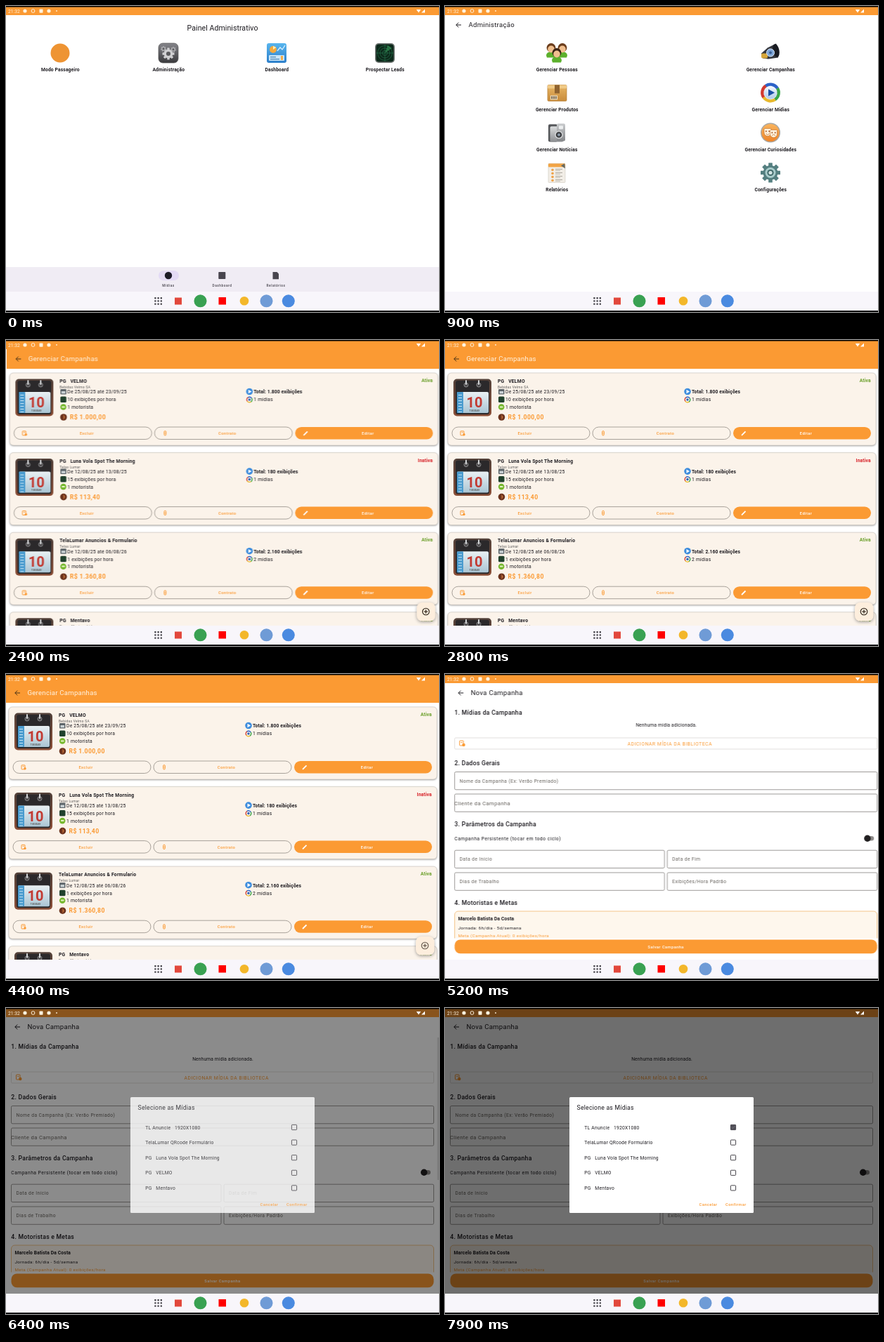
Write an HTML page with a canvas that moves like this. It is 616 px wide and 436 px high and loops after 8 s.

```html
<!DOCTYPE html>
<html lang="pt-BR">
<head>
<meta charset="utf-8">
<title>Painel Administrativo</title>
<style>
html, body { margin: 0; width: 100%; height: 100%; overflow: hidden; background: #fff; }
canvas { display: block; }
</style>
</head>
<body>
<canvas id="stage" width="616" height="436"></canvas>
<script>
const W = 616, H = 436, TOP = 13, BOTTOM = 407, LOOP = 8000, STEP = 100, DP = 0.48125;
const ORANGE = '#fb9a33', INK = '#1d1b20';
const OPEN = { admin: 380, list: 1800, form: 4773, dialog: 6200 }, SLIDE = 800;
const screen = document.getElementById('stage').getContext('2d');
let c = screen;

// weight, size in dp, letter spacing in px
const FONT = {
  headline: [400, 22, 0.05], title: [400, 20, 0.24], section: [500, 18, 0.24], dialog: [400, 18, 0.24],
  bold: [600, 14, 0.13], name: [600, 14, 0.25], body: [400, 14, 0.24], note: [400, 14, 0.12],
  wide: [400, 14, 0.47], label: [400, 14, 0.4], big: [400, 16, 0.36], caps: [400, 14, 0.58],
  small: [400, 13, 0.35], button: [500, 12, 0.4], tiny: [400, 10, 0.3], nav: [500, 10, 0.5],
  price: [700, 18, 0.38], clock: [400, 14, 0]
};

function text(s, x, y, style, color = INK, align = 'left') {
  const [weight, size, gap] = FONT[style];
  c.font = `${weight} ${size * DP}px Roboto, sans-serif`;
  c.letterSpacing = gap + 'px';
  c.textAlign = align;
  c.fillStyle = color;
  c.fillText(s, x, y);
}

function box(x, y, w, h, r, fill, stroke, line = 0.7) {
  c.beginPath();
  c.roundRect(x, y, w, h, r);
  if (fill) { c.fillStyle = fill; c.fill(); }
  if (stroke) { c.strokeStyle = stroke; c.lineWidth = line; c.stroke(); }
}

function disc(x, y, r, fill, stroke, line = 1) {
  c.beginPath();
  c.arc(x, y, r, 0, 7);
  if (fill) { c.fillStyle = fill; c.fill(); }
  if (stroke) { c.strokeStyle = stroke; c.lineWidth = line; c.stroke(); }
}

function poly(points, fill, stroke, line = 1) {
  c.beginPath();
  points.forEach(([x, y]) => c.lineTo(x, y));
  if (fill) { c.fillStyle = fill; c.fill(); }
  if (stroke) { c.strokeStyle = stroke; c.lineWidth = line; c.stroke(); }
}

function shade(y0, y1, a, b) {
  const g = c.createLinearGradient(0, y0, 0, y1);
  g.addColorStop(0, a);
  g.addColorStop(1, b);
  return g;
}

function at(x, y, draw) {
  c.save();
  c.translate(x, y);
  draw();
  c.restore();
}

function gear(x, y, r, teeth, color, hole) {
  at(x, y, () => {
    for (let i = 0; i < teeth; i++) {
      box(-r * 0.2, -r, r * 0.4, r * 0.5, 0.5, color);
      c.rotate(Math.PI * 2 / teeth);
    }
    disc(0, 0, r * 0.75, color);
    disc(0, 0, r * 0.36, hole);
  });
}

function backArrow(color) {
  poly([[20, 27], [12.8, 27]], null, color, 1);
  poly([[16.2, 23.6], [12.8, 27], [16.2, 30.4]], null, color, 1);
}

function colorRing(r, line) {
  ['#3aa648', '#e9b92c', '#d23a30', '#2c62c8'].forEach((color, i) => {
    c.beginPath();
    c.arc(0, 0, r, i * 1.571 - 0.6, i * 1.571 + 1);
    c.strokeStyle = color;
    c.lineWidth = line;
    c.stroke();
  });
}

const icons = {
  mode() { disc(0, 0, 13.5, '#ee9433'); },
  admin() {
    box(-14, -14, 28, 28, 6, shade(-14, 14, '#85858a', '#3a3a3d'), '#555');
    gear(0, 1, 8.5, 8, '#d0d0d2', '#59595c');
    gear(-7, -6, 4, 7, '#aaaaad', '#59595c');
    gear(7, -5, 4, 7, '#aaaaad', '#59595c');
  },
  dashboard() {
    box(-14, -14, 28, 28, 3, shade(-14, 14, '#58b5ee', '#2c7fca'));
    disc(-5, -5, 5, '#f4a93c');
    poly([[-5, -5], [-5, -10], [-0.5, -8]], '#fff0b8');
    poly([[1, -3], [5, -8], [8, -5], [12, -11]], null, '#d9f1ff', 1.3);
    box(-11, 3, 22, 8, 1, '#c8e5f8');
    box(-9, 5, 8, 1.4, 0, '#5790bd');
    box(-9, 8, 13, 1.4, 0, '#5790bd');
    box(6, 4, 3, 6, 0, '#f3ad49');
  },
  radar() {
    box(-14, -14, 28, 28, 5, '#737977');
    box(-12.5, -12.5, 25, 25, 4, '#0d291b');
    for (const r of [3.5, 7, 10.5]) disc(0, 0, r, null, '#24704a', 0.7);
    poly([[-12, 0], [12, 0]], null, '#24704a', 0.7);
    poly([[0, -12], [0, 12]], null, '#24704a', 0.7);
    poly([[0, 0], [4, -11], [10, -7]], 'rgba(66,180,104,.5)');
  },
  people() {
    for (const [x, y, hair] of [[-8, -7, '#6b3d1c'], [8, -7, '#6b3d1c'], [0, 0, '#3b2314']]) at(x, y, () => {
      c.beginPath();
      c.ellipse(0, 11, 7, 5.5, 0, Math.PI, 0);
      c.lineTo(6, 14);
      c.lineTo(-6, 14);
      c.fillStyle = '#5cb02c';
      c.fill();
      disc(0, 0, 6.4, hair);
      c.beginPath();
      c.ellipse(0, 2, 4.8, 5, 0, 0, 7);
      c.fillStyle = '#f0bf8e';
      c.fill();
    });
  },
  megaphone() {
    poly([[-13, 1], [-4, -7], [8, -13], [12, -4], [11, 7], [-3, 9], [-11, 8]], '#34363d');
    c.beginPath();
    c.ellipse(8, -3, 4.5, 9.5, -0.2, 0, 7);
    c.fillStyle = '#191b22';
    c.fill();
    box(-13, 1, 9, 7, 2, '#d6a63a');
    disc(0, 0, 5.5, '#7ea6d8', '#dbe6f4');
    disc(0, 0, 2, '#3a5f96');
  },
  parcel() {
    box(-13, -11, 27, 23, 1.5, shade(-11, 12, '#e9b766', '#c88c3c'), '#b67d33');
    box(-13, -11, 27, 5, 1, '#f0ca87');
    box(-3, -11, 7, 12, 0, '#8f6330');
    box(-9, 4, 10, 6, 0, '#f4e7cb');
    for (let i = 0; i < 4; i++) box(-8 + i * 2.2, 5, 1.2, 4, 0, '#5c4930');
  },
  play() {
    disc(0, 0, 14, '#e9eef5');
    colorRing(11.8, 4.2);
    disc(0, 0, 9, shade(-9, 9, '#f7fbff', '#afc9e9'));
    poly([[-3, -5], [6, 0], [-3, 5]], '#194fa6');
  },
  camera() {
    box(-12, -12, 13, 25, 2, '#55575a');
    box(-9.5, -9, 19, 22, 2, shade(-9, 13, '#dcdedf', '#8b8d90'));
    box(0, -13, 12, 25, 2, shade(-13, 12, '#c9cbcd', '#85878a'));
    box(3, -10, 6, 5, 1, '#eceeef');
    disc(3, 3, 5, '#3b3d40', '#d8dadb', 1.4);
    disc(3, 3, 2, '#8b99a8');
  },
  masks() {
    disc(0, 0, 14, '#a9a7a3');
    disc(0, 0, 12.6, shade(-12, 12, '#f9b35c', '#ee862b'));
    for (const [x, y, mood] of [[-4, -1, 1], [4.5, 1, -1]]) at(x, y, () => {
      box(-5, -5, 10, 11, [1, 1, 5, 5], '#fff1dc', '#ba691f', 0.6);
      disc(-2.2, -1, 1, '#a2521e');
      disc(2.2, -1, 1, '#a2521e');
      c.beginPath();
      c.arc(0, 2.8 - mood * 0.8, 2, mood > 0 ? 0 : Math.PI, mood > 0 ? Math.PI : 0);
      c.stroke();
    });
  },
  report() {
    box(-12, -13, 24, 27, 1, '#f2eee7', '#d3cec5');
    box(-12, -13, 24, 5, 1, '#f2a445');
    for (let y = -4; y < 12; y += 5) {
      disc(-6, y, 1.8, '#eea34c');
      box(-2, y - 1.4, 10, 1, 0, '#aaa69e');
      box(-2, y + 0.6, 7, 1, 0, '#c2beb6');
    }
    poly([[6, -10], [11, -13], [12, -6]], '#636b67');
  },
  settings() {
    gear(0, 0, 14, 8, '#547f80', '#547f80');
    disc(0, 0, 7.5, '#a9cccb');
    disc(0, 0, 4.6, '#3f6869');
    disc(0, 0, 2.6, '#d4e5e4');
  }
};

function tile(icon, label, x, y) {
  at(x, y, icons[icon]);
  text(label, x + 0.3, y + 26, 'bold', INK, 'center');
}

function homePage() {
  text('Painel Administrativo', 308, 35, 'headline', INK, 'center');
  [['mode', 'Modo Passageiro'], ['admin', 'Administração'], ['dashboard', 'Dashboard'], ['radar', 'Prospectar Leads']]
    .forEach(([icon, label], i) => tile(icon, label, 77 + i * 154, 67));
  box(0, 372, W, BOTTOM - 372, 0, '#f0ecf4');
  box(217, 377, 29, 14, 7, '#e3daf5');
  disc(231, 384, 5.2, '#1b1928');
  box(302.3, 379, 10, 10, 0.8, '#48454e');
  poly([[379.5, 379], [385.5, 379], [388, 381.5], [388, 389.3], [379.5, 389.3]], '#48454e');
  ['Mídias', 'Dashboard', 'Relatórios'].forEach((s, i) =>
    text(s, 231 + i * 76.5, 399.8, 'nav', '#48454e', 'center'));
}

function adminPage() {
  backArrow(INK);
  text('Administração', 30.5, 30.3, 'title');
  [['people', 'Gerenciar Pessoas', 'megaphone', 'Gerenciar Campanhas'],
   ['parcel', 'Gerenciar Produtos', 'play', 'Gerenciar Mídias'],
   ['camera', 'Gerenciar Notícias', 'masks', 'Gerenciar Curiosidades'],
   ['report', 'Relatórios', 'settings', 'Configurações']]
    .forEach(([a, la, b, lb], i) => {
      tile(a, la, 156, 66.5 + i * 57);
      tile(b, lb, 460, 66.5 + i * 57);
    });
}

function calendar() {
  box(12, 55.5, 54, 53, 5, shade(55, 109, '#504039', '#8b4e36'));
  box(15, 58, 48, 48, 3, '#2b292b');
  box(17, 74, 45, 30, 2, shade(74, 104, '#e9f0f3', '#aac5d4'));
  box(17, 74, 9, 30, 1, '#4a9bce');
  for (let y = 78; y < 103; y += 4) box(19, y, 5, 1, 0, '#c7e4f4');
  for (const x of [30, 48]) {
    disc(x, 64, 3, '#4a484a', '#8b8b8d');
    box(x - 1, 57, 2, 7, 1, '#d0d2d4');
  }
  c.font = '700 20px Roboto, sans-serif';
  c.letterSpacing = '0px';
  c.textAlign = 'center';
  c.fillStyle = '#c23a32';
  c.fillText('10', 42, 96);
  c.font = '500 3.5px Roboto, sans-serif';
  c.fillStyle = '#555';
  c.fillText('TUESDAY', 42, 101.5);
}

function buttonIcon(kind, x, y, color) {
  if (kind === 'Excluir') {
    box(x - 3, y - 3, 5, 6, 0.5, null, color, 1);
    poly([[x - 1.5, y - 1], [x + 1, y - 1]], null, color, 0.8);
    disc(x + 2, y + 2, 1.7, color);
  } else if (kind === 'Contrato') {
    box(x - 1.4, y - 3.2, 2.8, 6.4, 1.4, null, color, 0.9);
    poly([[x, y - 1.5], [x, y + 1.8]], null, color, 0.8);
  } else {
    poly([[x - 3, y + 3], [x + 2.5, y - 2.5]], null, color, 1.8);
  }
}

function campaignCard(y, [name, client, dates, perHour, total, media, price, active]) {
  at(0, y, () => {
    c.save();
    c.shadowColor = 'rgba(0,0,0,.4)';
    c.shadowBlur = 2.5;
    c.shadowOffsetY = 1;
    box(4, 47, 609, 103, 5, '#fbf3ea');
    c.restore();
    box(4, 47, 609, 103, 5, null, '#cbc4bd', 0.6);
    calendar();
    text(name, 75, 61, 'name');
    text(client, 75, 69, 'tiny', '#555');
    box(76, 70, 8.5, 7.5, 1, '#5c6469');
    box(77.5, 73, 5.5, 3.3, 0, '#cbd3d6');
    box(76, 80.5, 8.5, 8.5, 1.5, '#20412c');
    disc(80.2, 95.5, 4.3, '#76b82f');
    box(77.8, 94.4, 4.8, 2, 1, '#e2f3c4');
    disc(80.5, 110, 4.8, '#6b321d');
    poly([[80.5, 106], [82.5, 110], [80.5, 114]], '#c9743d');
    text(dates, 86, 76.4, 'body');
    text(perHour + ' exibições por hora', 86, 87.3, 'body');
    text('1 motorista', 86, 98, 'body');
    text(price, 89.5, 113, 'price', ORANGE);
    disc(345, 73.5, 4.8, '#3e8ddd');
    poly([[343.5, 70.8], [348, 73.5], [343.5, 76.2]], '#fff');
    at(345, 85, () => {
      colorRing(3.8, 1.4);
      disc(0, 0, 1.8, '#3568b6');
    });
    text(`Total: ${total} exibições`, 351, 76.4, 'bold');
    text(media + ' mídias', 351, 87.3, 'body');
    text(active ? 'Ativa' : 'Inativa', 605.8, 60, 'bold', active ? '#6ca02c' : '#d8232a', 'right');
    ['Excluir', 'Contrato', 'Editar'].forEach((label, i) => {
      const x = 10 + i * 200, solid = i === 2;
      box(x, 124, 196, 17.5, 8.75, solid ? ORANGE : null, solid ? null : '#857f78');
      buttonIcon(label, x + 15, 132.8, solid ? '#fff' : ORANGE);
      text(label, x + 103.5, 135, 'button', solid ? '#fff' : ORANGE, 'center');
    });
  });
}

const campaigns = [
  ['PG   VELMO', 'Bebidas Velmo SA', 'De 25/08/25 até 23/09/25', 10, '1.800', 1, 'R$ 1.000,00', true],
  ['PG   Luna Vola Spot The Morning', 'Telas Lumar', 'De 12/08/25 até 13/08/25', 15, '180', 1, 'R$ 113,40', false],
  ['TelaLumar Anuncios & Formulario', 'Telas Lumar', 'De 12/08/25 até 06/08/26', 1, '2.160', 2, 'R$ 1.360,80', true],
  ['PG   Mentavo', 'Doces Mentavo Ltda', '', 1, '', 1, '', true]
];

function fabIcon(alpha) {
  c.save();
  c.globalAlpha *= alpha;
  disc(596, 387, 4.8, null, '#241a10', 1.1);
  poly([[593.2, 387], [598.8, 387]], null, '#241a10', 1.1);
  poly([[596, 384.2], [596, 389.8]], null, '#241a10', 1.1);
  c.restore();
}

function campaignsPage() {
  box(0, TOP, W, 41 - TOP, 0, ORANGE);
  backArrow('#4a3216');
  text('Gerenciar Campanhas', 30.5, 30.3, 'title', '#fff4e4');
  campaigns.forEach((item, i) => campaignCard(i * 113.6, item));
  c.save();
  c.shadowColor = 'rgba(0,0,0,.35)';
  c.shadowBlur = 4;
  c.shadowOffsetY = 1.5;
  box(583, 374, 26.5, 26.5, 7.5, '#fdeedd');
  c.restore();
}

function field(x, y, w, label) {
  box(x, y, w, 25.3, 1.8, null, '#85817e', 0.8);
  text(label, x + 7, y + 15.2, 'label', '#68645f');
}

function formPage() {
  backArrow(INK);
  text('Nova Campanha', 30.5, 30.3, 'title');
  text('1. Mídias da Campanha', 7.3, 58.2, 'section');
  text('Nenhuma mídia adicionada.', 308.5, 75.4, 'note', INK, 'center');
  box(7.5, 91, 601, 16, 1.5, null, '#d6d2ce');
  box(14.5, 95, 5.5, 7, 0.8, null, ORANGE, 1);
  poly([[16, 97.5], [18.6, 97.5]], null, ORANGE, 0.8);
  disc(20.3, 101, 2.2, ORANGE);
  text('ADICIONAR MÍDIA DA BIBLIOTECA', 313.7, 101.6, 'caps', ORANGE, 'center');
  text('2. Dados Gerais', 7.3, 130.2, 'section');
  field(7.5, 139.5, 601, 'Nome da Campanha (Ex: Verão Premiado)');
  field(7.5, 171, 601, '');
  text('Cliente da Campanha', 7, 186.7, 'big', '#68645f');
  text('3. Parâmetros da Campanha', 7.3, 216.7, 'section');
  text('Campanha Persistente (tocar em todo ciclo)', 7.3, 236.5, 'wide');
  box(591, 231, 13, 6.6, 3.3, '#8e8b89');
  disc(594.7, 234.3, 4.7, '#211f20');
  field(7.5, 251.2, 298.5, 'Data de Início');
  field(310, 251.2, 298.5, 'Data de Fim');
  field(7.5, 283, 298.5, 'Dias de Trabalho');
  field(310, 283, 298.5, 'Exibições/Hora Padrão');
  text('4. Motoristas e Metas', 7.3, 329.2, 'section');
  c.save();
  c.beginPath();
  c.rect(0, 330, W, 46.5);
  c.clip();
  box(7.5, 338, 601, 70, 5, '#fef7ed', '#f2b56c', 0.8);
  text('Marcelo Batista Da Costa', 12.5, 350.8, 'bold');
  text('Jornada: 6h/dia - 5d/semana', 12.5, 363.8, 'small');
  text('Meta (Campanha Atual): 0 exibições/hora', 12.5, 374.8, 'small', ORANGE);
  c.restore();
  box(7.5, 378.5, 601, 19.8, 8, ORANGE);
  text('Salvar Campanha', 308, 390.6, 'button', '#fff', 'center');
}

function render(draw) {
  const sheet = document.createElement('canvas');
  sheet.width = W;
  sheet.height = H;
  c = sheet.getContext('2d');
  box(0, 0, W, H, 0, '#fff');
  draw();
  c = screen;
  return sheet;
}

const [home, admin, list, form] = [homePage, adminPage, campaignsPage, formPage].map(render);

const clamp = v => Math.max(0, Math.min(1, v));

function bezier(x, x1, y1, x2, y2) {
  const curve = (s, a, b) => 3 * (1 - s) * (1 - s) * s * a + 3 * (1 - s) * s * s * b + s * s * s;
  let lo = 0, hi = 1;
  for (let i = 0; i < 24; i++) {
    const mid = (lo + hi) / 2;
    if (curve(mid, x1, x2) < x) lo = mid; else hi = mid;
  }
  return curve(lo, y1, y2);
}

// Material "emphasized" easing: two joined cubics
function emphasized(p) {
  if (p <= 0 || p >= 1) return clamp(p);
  return p < 1 / 6
    ? 0.4 * bezier(p * 6, 0.3, 0, 0.8, 0.15)
    : 0.4 + 0.6 * bezier((p - 1 / 6) * 1.2, 0.05, 0.7, 0.1, 1);
}

function sheetAt(page, x, alpha) {
  if (alpha <= 0) return;
  c.globalAlpha = alpha;
  c.drawImage(page, x, 0);
  c.globalAlpha = 1;
}

function slide(from, to, p) {
  const e = emphasized(p), shift = W / 4;
  sheetAt(from, -shift * e, 1 - clamp(p * 4));
  sheetAt(to, shift * (1 - e), clamp(p * 2));
}

function checkbox(x, y, fill) {
  box(x - 3.6, y - 3.6, 7.2, 7.2, 0.8, null, '#454349', 1);
  if (!fill) return;
  c.save();
  c.globalAlpha *= fill;
  box(x - 3.8, y - 3.8, 7.6, 7.6, 0.8, '#504e57');
  poly([[x - 2.2, y], [x - 0.6, y + 1.6], [x + 2.4, y - 1.6]], null, '#77757d', 0.9);
  c.restore();
}

function scrollbar(t) {
  const p = (t - OPEN.form) / SLIDE, fade = clamp((6500 - t) / 300);
  c.globalAlpha = fade;
  box(613.6 + W / 4 * (1 - emphasized(p)), 42, 2.4, 203, 0, '#a3a1a2');
  c.globalAlpha = 1;
}

function mediaDialog(t) {
  const shown = clamp((t - OPEN.dialog) / 250);
  if (!shown) return;
  box(0, 0, W, BOTTOM, 0, `rgba(0,0,0,${0.57 * shown})`);
  c.globalAlpha = shown;
  box(177, 127, 262, 165, 1.5, '#fff');
  text('Selecione as Mídias', 187.5, 145.2, 'dialog');
  ['TL Anuncie   1920X1080', 'TelaLumar QRcode Formulário', 'PG   Luna Vola Spot The Morning', 'PG   VELMO', 'PG   Mentavo']
    .forEach((s, i) => {
      const y = 170 + i * 21.6;
      const fill = i ? 0 : t >= 7900 ? 1 : t >= 7800 ? 0.5 : t >= 7600 ? 0.12 : 0;
      text(s, 198.3, y + 2.5, 'body');
      checkbox(410, y, fill);
    });
  text('Cancelar', 374.5, 282.2, 'button', ORANGE, 'center');
  text('Confirmar', 413.8, 282.2, 'button', ORANGE, 'center');
  c.globalAlpha = 1;
}

function statusIcons() {
  const pale = '#fff3df';
  text('21:32', 3, 9.5, 'clock', pale);
  disc(27, 7, 2.6, pale);
  disc(38.5, 7, 2.4, null, pale, 1);
  box(47.5, 4.5, 5, 5.2, 0.8, pale);
  disc(61, 7, 2.6, pale);
  disc(72, 7, 0.9, pale);
  poly([[583.8, 5], [590.2, 5], [587, 9.6]], '#fff');
  poly([[591, 9.6], [596, 9.6], [596, 4.6]], '#fff');
}

function taskbar() {
  box(0, BOTTOM, W, H - BOTTOM, 0, '#f8f6fb');
  for (let i = 0; i < 9; i++) box(211.2 + i % 3 * 4.2, 415 + Math.floor(i / 3) * 4.2, 2.4, 2.4, 0.8, '#3e3d43');
  box(240, 415.5, 10, 10, 0, '#e2483c');
  disc(276.5, 420.3, 9, '#39a152');
  box(302.5, 415, 10.5, 10.5, 0, '#f00');
  disc(339, 420.3, 6.3, '#f3b72a');
  disc(370.5, 420.3, 9, '#6f9bd6');
  disc(401.8, 420.3, 9, '#4a8ae0');
  box(0, 434, W, 2, 0, '#000');
}

function draw(t) {
  c.clearRect(0, 0, W, H);
  box(0, 0, W, H, 0, '#fff');
  if (t < OPEN.list) slide(home, admin, (t - OPEN.admin) / SLIDE);
  else if (t < 5100) {
    const p = (t - OPEN.list) / SLIDE;
    slide(admin, list, p);
    c.save();
    c.translate(W / 4 * (1 - emphasized(p)), 0);
    c.globalAlpha = clamp(p * 2);
    fabIcon(t >= 4400 && t < 4700 ? 0.72 : 1);
    c.restore();
  } else {
    slide(list, form, (t - OPEN.form) / SLIDE);
    scrollbar(t);
  }
  box(0, 0, W, TOP, 0, ORANGE);
  box(0, 0, W, 1.5, 0, '#000');
  mediaDialog(t);
  statusIcons();
  taskbar();
}

const start = performance.now();
function frame() {
  const t = (performance.now() - start) % LOOP;
  draw(Math.floor(t / STEP) * STEP);
  requestAnimationFrame(frame);
}
frame();
</script>
</body>
</html>
```
